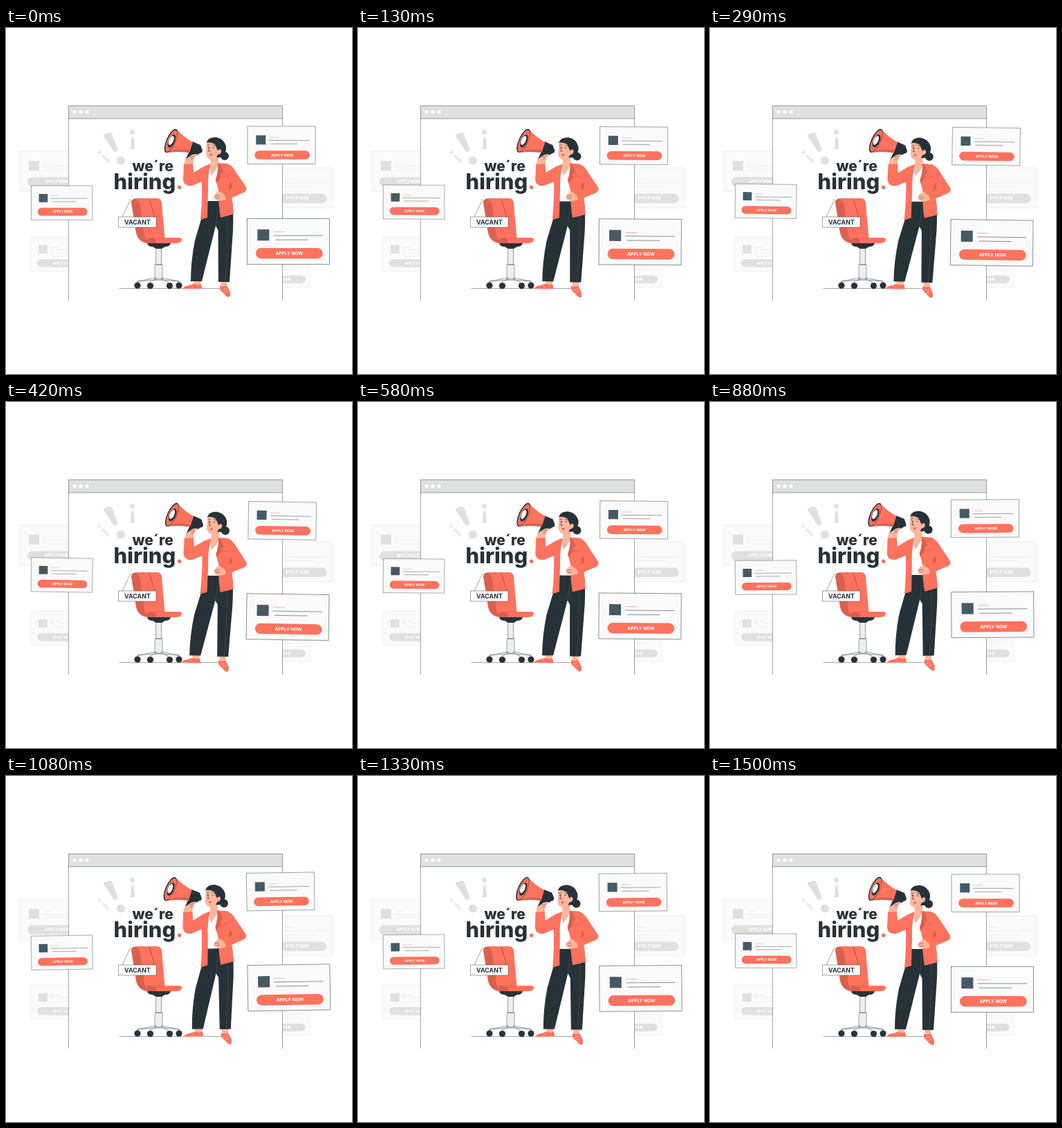
Recreate the animation shown at these times as an HTML page. Size 500 by 500 pixels, loop 1.54 s.

```html
<!DOCTYPE html>
<html lang="en">
<head>
<meta charset="utf-8">
<title>We're hiring</title>
<style>
  html, body { margin: 0; height: 100%; overflow: hidden; background: #fff; }
  svg { display: block; width: 100vw; height: 100vh; }
  text { font-family: Inter, sans-serif; font-weight: 700; }
  .ink { fill: #263238; }
  .coral { fill: #ff725e; }
  .shade { fill: #d9604f; }
  .skin { fill: #ffb69c; }
  .grey { fill: #e0e0e0; }
  .white { fill: #fff; }
  .line { fill: none; stroke: #263238; stroke-width: .45; stroke-linecap: round; stroke-linejoin: round; }
  .middle { text-anchor: middle; }
</style>
</head>
<body>
<svg viewBox="0 0 500 500">
  <g id="backCards"></g>

  <!-- browser window -->
  <path class="white" d="M90.5 112.5H399.5V394H90.5Z"/>
  <path class="grey" d="M90.5 112.5H399.5V131H90.5Z"/>
  <path class="line" d="M90.5 393.5V112.5H399.5V393.5M90.5 131H399.5"/>
  <g class="white">
    <circle cx="99" cy="121.5" r="2.6"/><circle cx="108" cy="121.5" r="2.6"/><circle cx="117" cy="121.5" r="2.6"/>
  </g>

  <!-- headline -->
  <g class="grey">
    <path d="M141 156Q141 154 143 153L150 151Q152 151 153 153L161.500 175Q162 177 160 178L157.500 179Q156 179 155 177.500Z"/>
    <circle cx="166" cy="191.500" r="6"/>
    <circle cx="182.500" cy="150.500" r="3.400"/>
    <path d="M181 158H184.500L186 174Q183 176.500 180 174.500Z"/>
    <g opacity=".6"><circle cx="135" cy="179.500" r="2.600"/><path d="M140 182L150 192 147 195 138 184Z"/></g>
  </g>
  <g class="ink">
    <text x="182.500" y="207" font-size="21" style="font-weight:800">we´re</text>
    <text x="155.500" y="233" font-size="31" style="font-weight:800">hiring<tspan class="coral">.</tspan></text>
  </g>

  <path class="line" d="M164 376.500H313"/>

  <!-- chair -->
  <path class="line" d="M217 318H224.500V342H217ZM215.500 342H226V363H215.500Z" style="fill:#eee"/>
  <path class="line" d="M217 361L190 366V370M225 361L250 366V370M218 362L208 367V370M224 362L234 367V370M190 366L217 364H225L250 366" style="fill:#f5f5f5"/>
  <g fill="#263238">
    <circle cx="190" cy="372" r="4.600"/><circle cx="208.500" cy="372.500" r="4.600"/>
    <circle cx="236.500" cy="372.500" r="4.600"/><circle cx="250" cy="372" r="4.600"/>
    <path d="M204 311H238Q237 316 230 316L225 319H217L212 316Q205 316 204 311Z"/>
  </g>
  <path class="shade" d="M181 252Q181 247 187 246.500L200 246 209 308 216 311H204Q191 309 188 296Z"/>
  <path class="coral" d="M186 246.500L218 246Q224 246 225 252L229.500 303H250Q255 303 254 307 252 311 246 311H212Q203 309 200 301L194 256Q193 248 186 246.500Z"/>
  <path class="shade" d="M204 304H230V303.300H203ZM206 311Q202 306 205 304H214Q219 306 217 311Z"/>
  <path class="line" d="M168 273L180 248M207 247L215 273"/>
  <path class="white" d="M163 273H217V288H163Z"/>
  <path class="line" d="M163 273H217V288H163Z"/>
  <text class="ink middle" x="190" y="284" font-size="8.900">VACANT</text>

  <!-- speaker -->
  <g class="sway">
    <path class="skin" d="M271 364H282L281 372H272ZM310 366H320L318 376H311Z"/>
    <path class="coral" d="M256 376Q257 373 264 372L271 369.500Q276 372 282 370L283.500 377H256ZM309 372Q314 375 319 372L322 378Q325 383 323.500 388 321 390 318 387L309 378Z"/>
    <path class="line" d="M257 377H283M267 371L270 374M312 378L318 377M315 382L320 380" style="stroke:#fff"/>
    <path class="ink" d="M285 250H327Q329 268 328 292L323 367H307L306.500 292 303 286 283 366H267Q267 337 273 307L283 273Z"/>
    <path class="line" d="M303 286L306 265M320 272Q321 310 317 366" style="stroke:#546067"/>

    <path class="white" d="M291 201L297 194 307 197 309 250H287Z"/>
    <path class="skin" d="M295 183H307V198Q302 207 297 213 293 205 296 198Z"/>
    <path class="coral" d="M257 196L270 194 271 209 286 200 296 196Q291 212 292 235L291 274 281 277Q284 243 283 222L268 228Q258 229 256 220Z"/>
    <path class="coral" d="M306 195L320 196Q327 199 331 206L347 230Q349 235 343 238L317 249 313 241 328 230 324 222Q327 250 329 269L310 274Q307 257 307 234L303 219Q307 207 306 195Z"/>
    <path class="shade" d="M306 195L310 198 314 208 309 212 312 214 304 224 303 219Q308 207 306 195ZM314 215L322 213V214L314 216ZM324 221L328 230 322 235Z"/>
    <path class="skin" d="M316 241L318 248 309 250Q302 249 300 245L303 239 309 236Z"/>
    <path class="line" d="M301 243L308 242M303 246L309 245"/>

    <!-- head -->
    <circle class="ink" cx="316" cy="185" r="6"/>
    <path class="ink" d="M290 164Q294 157 304 158 315 160 318 171 319 181 311 187L304 187 300 170Z"/>
    <path class="skin" d="M290 164Q298 163 303 167L306 177Q309 173 311 177 312 182 306 183 304 189 298 190 290 190 289 182Z"/>
    <path class="ink" d="M289 166Q295 159 304 164L310 174 306 177 302 168Q296 164 289 166Z"/>
    <path class="line" d="M291 169.500L294 168.500M299 169L303 170M294 172L292.500 178H295" style="stroke-width:.7"/>
    <circle class="ink" cx="292.500" cy="172.500" r=".8"/><circle class="ink" cx="300" cy="173" r=".8"/>
    <ellipse class="shade" cx="296" cy="183" rx="1.800" ry="1.500"/>

    <!-- megaphone -->
    <path class="ink" d="M269 164L281 169 284 177 283 180 280 181 277 183 270 184 265 193 259 191 264 180Z"/>
    <path class="coral" d="M246 146Q257 158 270 165L265 180Q248 178 232 180Z"/>
    <path class="shade" d="M232 180Q248 173 266 177L265 180Q248 178 232 180Z"/>
    <g transform="rotate(24 238.500 163)">
      <ellipse class="ink" cx="238.500" cy="163" rx="6.800" ry="18.500"/>
      <ellipse class="coral" cx="239" cy="163" rx="5.800" ry="17"/>
      <ellipse class="ink" cx="239.500" cy="163" rx="4.500" ry="10"/>
      <ellipse class="white" cx="238.500" cy="162.500" rx="3.200" ry="7"/>
    </g>
    <path class="skin" d="M258 197Q257 190 263 187L269 183 275 182Q277 184 272 187L270 196Z"/>
    <path class="line" d="M266 187L272 185M267 190L271 188"/>
  </g>

  <g id="frontCards" class="sway"></g>
</svg>
<script>
  const byId = id => document.getElementById(id);

  // Cards are laid out 100 units wide and scaled into place.
  function card(x, y, scale, front) {
    const dark = front ? '#455a64' : '#e0e0e0';
    const pill = front ? '#ff725e' : '#e0e0e0';
    const edge = front ? '#263238' : '#dedede';
    return `<g transform="translate(${x} ${y}) scale(${scale})" fill="none" stroke="${edge}" stroke-width=".45">
      <rect width="100" height="55.5" fill="#fafafa"/>
      <rect x="12.5" y="13.4" width="14.3" height="13.5" fill="${dark}" stroke="none"/>
      <path d="M32 16.3H46" stroke="${pill}"/>
      <path d="M32 20.8H92M34 26H74"/>
      <rect x="10.5" y="36" width="81.3" height="12.8" rx="6.4" fill="${pill}" stroke="none"/>
      <text class="white middle" x="51.2" y="44.4" font-size="5.5" stroke="none">APPLY NOW</text>
    </g>`;
  }

  byId('backCards').innerHTML =
    card(20, 178, 1.045) + card(36, 302, .89) + card(367.5, 202, 1.045) + card(351, 325.6, .89);
  byId('frontCards').innerHTML =
    card(349, 142, .98, true) + card(36.5, 228, .885, true) + card(348.5, 275.2, 1.19, true);

  const LOOP = 1540, SWAY = 1.5, FPS = 24;
  const swaying = document.querySelectorAll('.sway');

  // Degrees: 0 to 1, down to -1, back to 0, at constant speed.
  function swayAngle(phase) {
    if (phase < .25) return phase * 4;
    if (phase < .75) return 2 - phase * 4;
    return phase * 4 - 4;
  }

  function draw(now) {
    const step = Math.floor((now % LOOP + 5) * FPS / 1000) % 37;
    const angle = swayAngle(step / FPS / SWAY % 1);
    swaying.forEach(g => g.setAttribute('transform', `rotate(${angle} 250 250)`));
    requestAnimationFrame(draw);
  }
  draw(performance.now());
</script>
</body>
</html>
```
